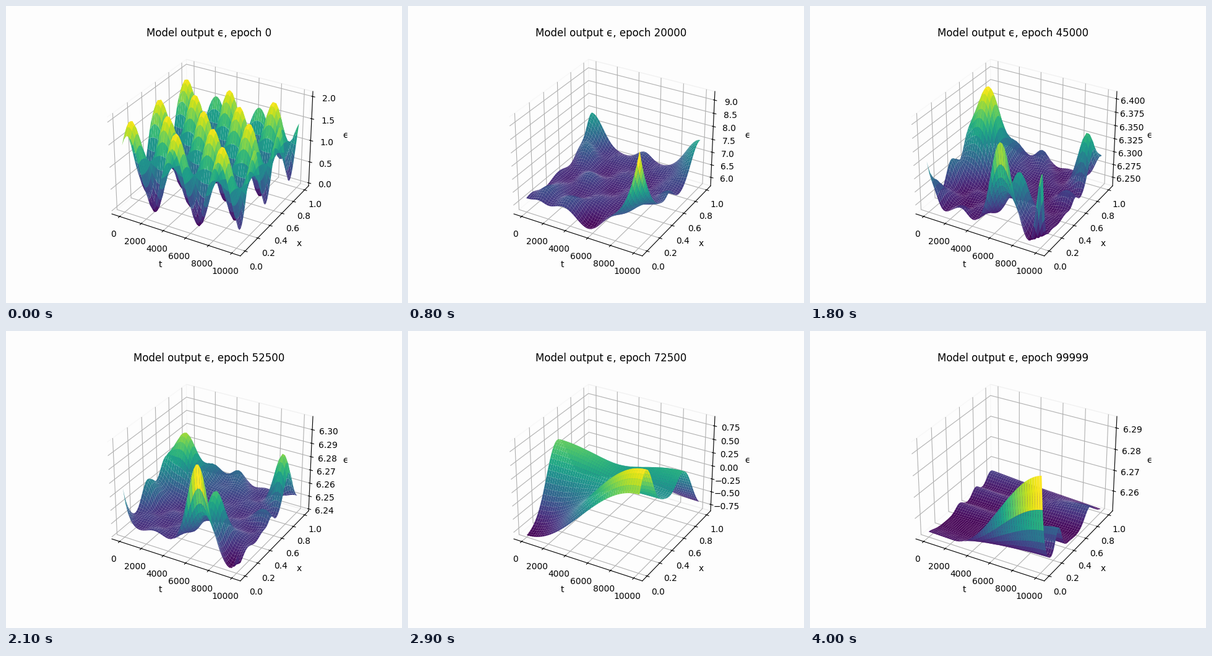
Animation of 640x480 px, one loop 4.1 s. Source, as a matplotlib script:

```python
import numpy as np
import matplotlib as mpl
import matplotlib.pyplot as plt
from matplotlib.animation import FuncAnimation
from matplotlib.ticker import MaxNLocator

FRAMES = 41
STEP = 100
PAPER = "#fdfdfd"
VIEW_PAD = 1 / 48

mpl.rcParams["axes3d.automargin"] = False

# t and x, both scaled to 0..1
a, b = np.meshgrid(np.linspace(0, 1, 50), np.linspace(0, 1, 50))


def bell(v, centre, width):
    return np.exp(-((v - centre) / width) ** 2)


def hill(height, ca, cb, wa, wb):
    return height * bell(a, ca, wa) * bell(b, cb, wb)


def ripple(height, ka, kb, shift=0.0):
    return height * np.cos(ka * a + shift) * np.cos(kb * b - shift)


def unit(s):
    return (s - s.min()) / (s.max() - s.min())


def checker():
    return np.cos(15.9 * (a - 0.055)) * np.cos(15.5 * (b - 0.05))


def corners():
    return (0.17 + 0.83 * np.exp((a - 1) / 0.13 - b / 0.18)
            + hill(0.36, 0, 1, 0.15, 0.12) + hill(0.38, 1, 1, 0.17, 0.2)
            + hill(0.12, 0.5, 0.95, 0.09, 0.1) + hill(0.16, 0.08, 0.78, 0.1, 0.1)
            + hill(0.13, 0.12, 0.1, 0.08, 0.12) + hill(0.08, 0.36, 0.12, 0.12, 0.12)
            + hill(0.1, 0.95, 0.5, 0.1, 0.07) + hill(0.07, 0.25, 0.5, 0.1, 0.1)
            - hill(0.12, 0.6, 0.03, 0.13, 0.15) + ripple(0.035, 17, 15, 0.8))


def peaks():
    return (0.07 + hill(0.93, 1, 0, 0.06, 0.06) + hill(0.52, 0.13, 0.59, 0.11, 0.13)
            + hill(0.48, 0.02, 1, 0.12, 0.1) + hill(0.18, 0.2, 0.75, 0.1, 0.14)
            + hill(0.27, 0.05, 0.06, 0.06, 0.1) + hill(0.18, 0.6, 0.05, 0.07, 0.07)
            + hill(0.1, 0.6, 0.32, 0.08, 0.08) + hill(0.14, 0.86, 0.12, 0.06, 0.07)
            + hill(0.3, 1, 1, 0.07, 0.12) + hill(0.08, 0.32, 0.02, 0.07, 0.07)
            + ripple(0.02, 24, 21, 0.5))


def ridges():
    return (0.16 + 0.84 * bell(a, 0.67, 0.12) * np.exp(-b / 0.055)
            + hill(0.44, 0.71, 0.2, 0.1, 0.1) + hill(0.56, 0.14, 0.7, 0.14, 0.14)
            + hill(0.26, 0.01, 0.36, 0.08, 0.12) + hill(0.2, 0, 0.6, 0.08, 0.12)
            + 0.35 * np.exp(-a / 0.035 - b / 0.06)
            + hill(0.56, 0.95, 0.83, 0.09, 0.1) + hill(0.14, 0.5, 0.94, 0.08, 0.08)
            + hill(0.14, 0.3, 0.9, 0.09, 0.09) + hill(0.08, 0.45, 0.8, 0.25, 0.15)
            + hill(0.14, 0.95, 0.55, 0.1, 0.06) + hill(0.12, 1, 0.02, 0.03, 0.02)
            - hill(0.14, 0.93, 0.03, 0.09, 0.1) + ripple(0.025, 21, 23, 0.4))


def twist():
    left = 0.72 * bell(b, 0.47, 0.24) + 0.25 * b ** 4
    right = (0.95 * bell(b, 0.09, 0.2) + 0.6 * bell(b, 0.69, 0.24)
             + 0.28 * bell(b, 0.38, 0.15))
    mix = (1 - np.cos(np.pi * a)) / 2
    return left + (right - left) * mix


def fin():
    rise = np.sin(np.pi / 2 * np.clip((a - 0.23) / 0.82, 0, 1)) ** 2
    right = 0.28 * bell(b, 0.28, 0.07) + 0.17 * bell(b, 0.8, 0.1)
    left = (0.07 * bell(b, 0.45, 0.08) + 0.1 * bell(b, 0.7, 0.08)
            + 0.14 * bell(b, 0.94, 0.1) + 0.04 * bell(b, 0, 0.1))
    return rise * np.exp(-b / 0.045) + rise * right + (1 - 0.8 * a) * left


# frame, shape, lowest value, span
KEYS = [
    (0, unit(checker()), 0.068, 1.905),
    (8, unit(corners()), 5.73, 3.52),
    (14, unit(peaks()), 6.232, 0.6005),
    (21, unit(ridges()), 6.2399, 0.0683),
    (30, unit(fin()), 6.2511, 0.0433),
]
TWIST = (unit(twist()), -0.84, 1.728)
TWIST_FRAMES = range(27, 30)


def surface_at(i):
    if i in TWIST_FRAMES:
        return TWIST
    if i >= KEYS[-1][0]:
        return KEYS[-1][1:]
    for (i0, s0, lo0, r0), (i1, s1, lo1, r1) in zip(KEYS, KEYS[1:]):
        if i < i1:
            w = (i - i0) / (i1 - i0)
            shape = unit(s0 + (s1 - s0) * w)
            return shape, lo0 + (lo1 - lo0) * w, r0 * (r1 / r0) ** w


fig = plt.figure(figsize=(6.4, 4.8), dpi=100, facecolor=PAPER)
ax = fig.add_subplot(projection="3d")
ax.set_facecolor(PAPER)
for axis in (ax.xaxis, ax.yaxis, ax.zaxis):
    axis.pane.set_fill(False)
ax.set_xlabel("t")
ax.set_ylabel("x")
ax.set_zlabel("ϵ")

side = 0.05 + 1.1 * VIEW_PAD
ax.set_xlim(-side * 1e4, (1 + side) * 1e4)
ax.set_ylim(-side, 1 + side)
ax.set_xticks(np.arange(0, 10001, 2000))
ax.set_yticks(np.arange(6) / 5)

locator = MaxNLocator(8, steps=[1, 2, 2.5, 5, 10])
drawn = []


def update(i):
    while drawn:
        drawn.pop().remove()
    shape, lo, span = surface_at(i)
    drawn.append(ax.plot_surface(a * 1e4, b, lo + span * shape, cmap="viridis"))

    # the first view has a wider z margin
    margin = 0.05 * span if i == 0 else 0
    z0, z1 = lo - margin, lo + span + margin
    pad = (z1 - z0) * VIEW_PAD
    ax.set_zlim(z0 - pad, z1 + pad)
    ticks = locator.tick_values(z0, z1)
    ax.set_zticks([v for v in ticks if z0 <= v <= z1])
    ax.set_title(f"Model output ϵ, epoch {min(2500 * i, 99999)}")
    return drawn


anim = FuncAnimation(fig, update, frames=FRAMES, interval=STEP,
                     init_func=lambda: [], repeat=True, repeat_delay=0)
plt.show()
```
